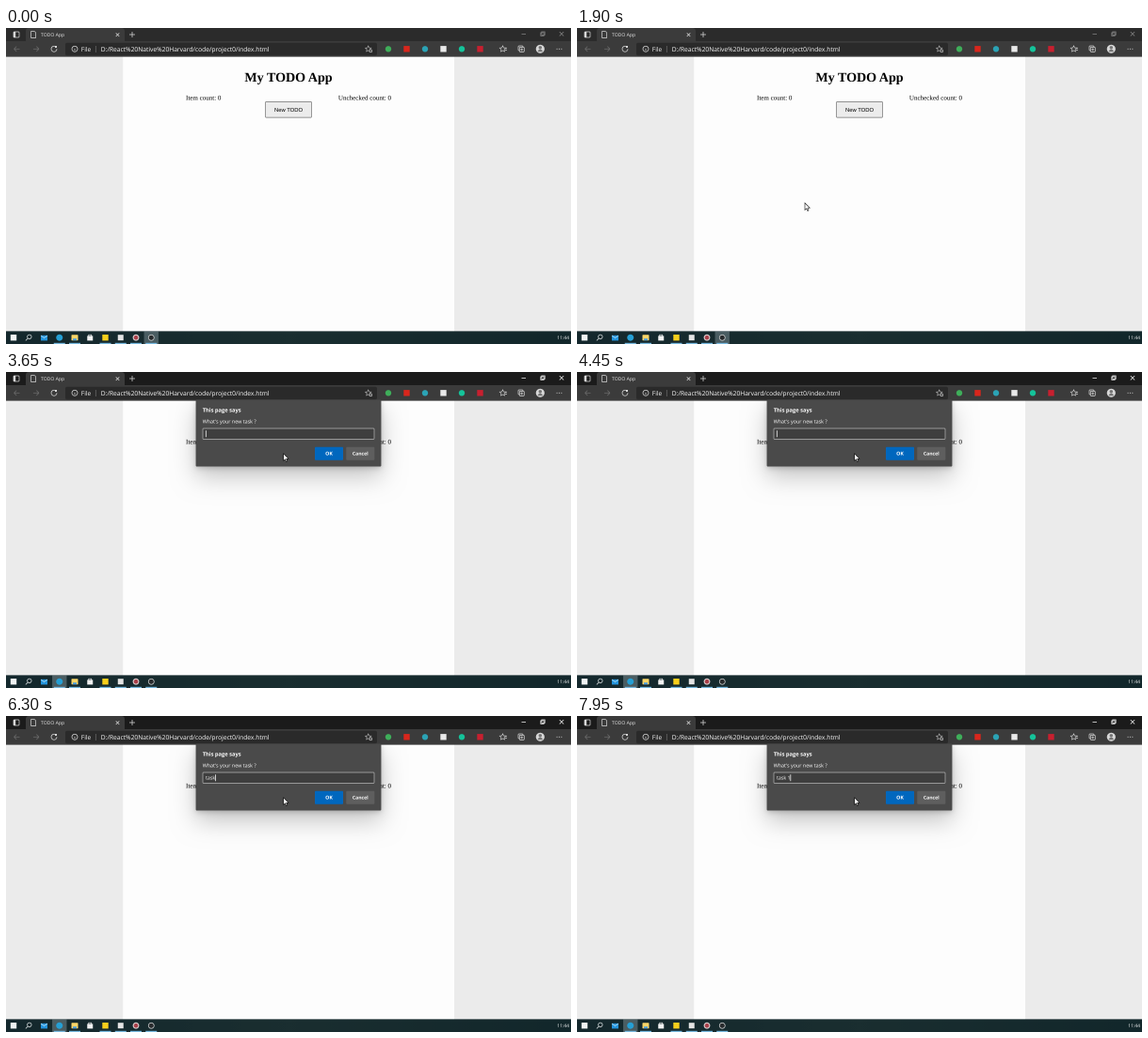
Animation of 600 by 336 pixels, one loop 8 s. Source, as an HTML page with a canvas:

```html
<!DOCTYPE html>
<html lang="en">
<head>
<meta charset="utf-8">
<title>TODO App</title>
<style>
html, body { margin: 0; width: 100%; height: 100%; overflow: hidden; background: #ebebeb; }
canvas { display: block; width: 600px; height: 336px; }
</style>
</head>
<body>
<canvas id="stage"></canvas>
<script>
const W = 600, H = 336, LOOP = 8000, TAU = 2 * Math.PI;
const UI = '"Open Sans", "Noto Sans", sans-serif';
const SANS = '"Liberation Sans", Arial, sans-serif';
const SERIF = '"Liberation Serif", "Times New Roman", serif';

const PRESS = 3050, RELEASE = 3350, DIALOG = 3450;
const BURSTS = [
  { word: 'task', start: 5650, gap: 150 },
  { word: ' 1', start: 6600, gap: 250 },
];

const canvas = document.getElementById('stage');
const ctx = canvas.getContext('2d');
// Drawn at double size so that small text scales down softly.
const scale = 2 * (window.devicePixelRatio || 1);
canvas.width = W * scale;
canvas.height = H * scale;
ctx.textRendering = 'geometricPrecision';

function ease(t, from, to) {
  const u = Math.min(1, Math.max(0, (t - from) / (to - from)));
  return u * u * (3 - 2 * u);
}

function rect(x, y, w, h, fill, r = 0) {
  ctx.fillStyle = fill;
  ctx.beginPath();
  ctx.roundRect(x, y, w, h, r);
  ctx.fill();
}

function frame(x, y, w, h, color, r = 0) {
  ctx.strokeStyle = color;
  ctx.lineWidth = 0.7;
  ctx.beginPath();
  ctx.roundRect(x, y, w, h, r);
  ctx.stroke();
}

function square(x, y, r, fill) {
  rect(x - r, y - r, 2 * r, 2 * r, fill);
}

function disc(x, y, r, fill, end = TAU) {
  ctx.fillStyle = fill;
  ctx.beginPath();
  ctx.arc(x, y, r, end === TAU ? 0 : Math.PI, end === TAU ? TAU : end + Math.PI);
  ctx.fill();
}

function ring(x, y, r, color, end = TAU) {
  ctx.strokeStyle = color;
  ctx.lineWidth = 0.75;
  ctx.beginPath();
  ctx.arc(x, y, r, 0, end);
  ctx.stroke();
}

function line(x, y, dx, dy, color) {
  ctx.strokeStyle = color;
  ctx.lineWidth = 0.75;
  ctx.beginPath();
  ctx.moveTo(x, y);
  ctx.lineTo(x + dx, y + dy);
  ctx.stroke();
}

function cross(x, y, r, color) {
  for (const s of [-1, 1]) line(x - r, y - s * r, 2 * r, 2 * s * r, color);
}

function plus(x, y, r, color) {
  line(x - r, y, 2 * r, 0, color);
  line(x, y - r, 0, 2 * r, color);
}

function arrow(x, y, dir, color) {
  line(x - 3, y, 6, 0, color);
  for (const s of [-1, 1]) line(x + 3 * dir, y, -2.7 * dir, 2.7 * s, color);
}

function star(x, y, r, color) {
  ctx.strokeStyle = color;
  ctx.lineWidth = 0.6;
  ctx.beginPath();
  for (let i = 0; i < 10; i++) {
    const a = (i / 10) * TAU - TAU / 4, d = i % 2 ? r * 0.48 : r;
    ctx.lineTo(x + d * Math.cos(a), y + d * Math.sin(a));
  }
  ctx.closePath();
  ctx.stroke();
}

function text(str, x, y, size, color, { family = UI, weight = 400, align = 'left' } = {}) {
  ctx.font = `${weight} ${size}px ${family}`;
  ctx.textAlign = align;
  ctx.fillStyle = color;
  ctx.fillText(str, x, y);
}

function drawPage(pressed) {
  rect(0, 30, W, 293, '#ebebeb');
  rect(124.2, 30, 351.8, 293, '#fdfdfd');
  text('My TODO App', 300, 57.2, 14.05, '#000', { family: SERIF, weight: 700, align: 'center' });
  text('Item count: 0', 191, 76.6, 7.03, '#000', { family: SERIF });
  text('Unchecked count: 0', 409, 76.6, 7.03, '#000', { family: SERIF, align: 'right' });
  rect(275.5, 78.5, 49, 16.6, pressed ? '#f5f5f5' : '#ececec', 0.8);
  frame(275.5, 78.5, 49, 16.6, pressed ? '#8d8d8d' : '#707070', 0.8);
  text('New TODO', 300, 89, 5.86, '#000', { family: SANS, align: 'center' });
}

function drawTabs(focused) {
  const pale = '#d8d8d8', tone = focused ? '#f2f2f2' : '#858585';
  rect(0, 0, W, 15, focused ? '#1b1b1b' : '#2b2b2b');
  rect(21, 0, 105, 16, '#3b3b3b', [3, 3, 0, 0]);
  frame(8, 4, 6, 6, pale, 1);
  rect(8, 4, 2.2, 6, pale);
  frame(26.6, 3.6, 5, 6.8, pale, [0, 2, 0, 0]);
  text('TODO App', 37, 9, 5.08, '#e8e8e8');
  cross(118.5, 7.2, 1.8, pale);
  plus(134, 7, 3, pale);
  line(547.5, 6.4, 4.5, 0, tone);
  frame(567.8, 5, 3.4, 3.4, tone);
  frame(568.8, 4, 3.4, 3.4, tone);
  cross(590, 6.3, 2.2, tone);
}

function drawToolbar() {
  const pale = '#d8d8d8', y = 22.3;
  rect(0, 14, W, 16.6, '#3b3b3b');
  arrow(11.5, y, -1, '#6c6c6c');
  arrow(32, y, 1, '#6c6c6c');
  ring(51, y, 3, pale, 5.4);
  rect(52, 19, 2, 2, pale);

  rect(63, 15.8, 331, 13.4, '#2a2a2a', 2);
  ring(73, y, 3, pale);
  line(73, 21.8, 0, 2.4, pale);
  text('File', 79.8, 24.9, 6.6, '#f0f0f0');
  line(95.3, 19, 0, 7, '#6a6a6a');
  text('D:/React%20Native%20Harvard/code/project0/index.html', 100.8, 24.9, 6.7, '#fafafa');
  star(384.7, y, 3.3, '#bdbdbd');
  disc(387.3, 24.4, 1.8, '#2a2a2a');
  ring(387.3, 24.4, 1.4, '#bdbdbd');

  const extensions = ['#3fae5a', '#d9261c', '#2ba3b5', '#e9e9e9', '#15c39a', '#c8202f'];
  extensions.forEach((color, i) => (i % 2 ? square : disc)(406 + 19.5 * i, y, 3.2, color));

  star(527.5, y, 3.4, pale);
  for (const dy of [-1, 1]) line(530, y + dy, 2, 0, pale);
  frame(544, 19, 5, 5, pale, 1);
  rect(545.3, 20.4, 5, 5, '#3b3b3b', 1);
  frame(545.3, 20.4, 5, 5, pale, 1);
  plus(547.8, 22.9, 1.5, pale);
  disc(567.3, y, 4.6, pale);
  disc(567.3, y - 1.5, 1.7, '#747474');
  disc(567.3, y + 3, 2.6, '#747474', Math.PI);
  for (const i of [-1, 0, 1]) disc(587.5 + 2.4 * i, y, 0.55, pale);
}

const taskIcons = [
  (x, y) => square(x, y, 3.2, '#f0f4f5'),
  (x, y) => {
    ring(x + 0.6, y - 0.9, 2.2, '#e6eaeb');
    line(x - 1, y + 0.8, -2.4, 2.4, '#e6eaeb');
  },
  (x, y) => {
    rect(x - 3.5, y - 2.4, 7, 5.6, '#2494dc');
    for (const s of [-1, 1]) line(x, y + 0.4, 3.5 * s, -2.6, '#b9e2fa');
  },
  (x, y) => disc(x, y, 3.5, '#259fd4'),
  (x, y) => {
    rect(x - 3.5, y - 3, 7, 6, '#f8d568', 0.6);
    rect(x - 2, y + 1, 4, 2, '#4a9ddc');
  },
  (x, y) => {
    frame(x - 1.5, y - 3, 3, 2, '#f2f2f2');
    rect(x - 3, y - 1.8, 6, 5, '#f2f2f2');
  },
  (x, y) => square(x, y, 3.2, '#f7cf1c'),
  (x, y) => square(x, y, 3, '#e4e4e4'),
  (x, y) => {
    disc(x, y, 3.4, '#dccfcf');
    disc(x, y, 2.3, '#a8404a');
  },
  (x, y) => {
    disc(x, y, 3.2, '#292c2e');
    ring(x, y, 3, '#d0d3d4');
  },
];

function drawTaskbar(focused) {
  const top = 322.4, active = focused ? 3 : 9;
  const bar = ctx.createLinearGradient(0, 0, W, 0);
  bar.addColorStop(0, '#14282d');
  bar.addColorStop(0.5, '#1a2e30');
  bar.addColorStop(1, '#12272b');
  rect(0, top, W, H - top, bar);
  taskIcons.forEach((icon, i) => {
    const x = 8 + 16.25 * i;
    if (i === active) rect(x - 7.7, top, 15.4, H - top, '#4a5d62');
    if (i > 2 && i !== 5) rect(x - 6, 334.8, 12, 1.2, '#76b9e0');
    icon(x, 329.2);
  });
  text('11:44', 598, 331, 5, '#fff', { align: 'right' });
}

function typing(t) {
  let value = '', last = DIALOG;
  for (const { word, start, gap } of BURSTS) {
    const n = Math.min(word.length, Math.floor((t - start) / gap) + 1);
    if (n < 1) break;
    value += word.slice(0, n);
    last = start + (n - 1) * gap;
  }
  return { value, caret: (t - last) % 1000 < 500 };
}

function panel(blur, dy, alpha) {
  ctx.shadowColor = `rgba(0,0,0,${alpha})`;
  ctx.shadowBlur = blur * scale;
  ctx.shadowOffsetY = dy * scale;
  rect(201.7, 29.5, 196.6, 71, '#4a4a4a', 1);
}

function button(label, x, size, fill) {
  rect(x, 79.8, 30, 13.9, fill, 0.8);
  text(label, x + 15, 88.6, size, '#fff', { weight: 700, align: 'center' });
}

function drawDialog(t) {
  ctx.save();
  ctx.beginPath();
  ctx.rect(0, 29.5, W, H);
  ctx.clip();
  panel(25, 11, 0.22);
  panel(6, 2, 0.18);
  ctx.restore();

  text('This page says', 208.7, 42.5, 5.75, '#fff', { weight: 700 });
  text("What's your new task ?", 208.7, 54.7, 5.4, '#fff');
  rect(209, 60, 182, 11.4, '#3e3e3e', 0.8);
  frame(209, 60, 182, 11.4, '#b4b4b4', 0.8);
  const { value, caret } = typing(t);
  text(value, 212, 67.5, 5.3, '#fff');
  if (caret) line(212.3 + ctx.measureText(value).width, 62.2, 0, 7, '#fff');
  button('OK', 328, 5.3, '#0067be');
  button('Cancel', 361.3, 5.1, '#5e5e5e');
}

const arrowhead = new Path2D('M0 0V7.5L1.7 6 2.9 8.5 4 8 2.9 5.5 5.2 5.4Z');

function drawPointer(t) {
  const enter = ease(t, 1050, 1700), aim = ease(t, 2250, 2900);
  ctx.save();
  ctx.translate(206 + 36 * enter + 52.7 * aim, 340 - 154 * enter - 99.2 * aim);
  ctx.fillStyle = '#fff';
  ctx.fill(arrowhead);
  ctx.strokeStyle = '#111';
  ctx.lineWidth = 0.6;
  ctx.stroke(arrowhead);
  ctx.restore();
}

function draw(t) {
  const focused = t >= PRESS;
  ctx.setTransform(scale, 0, 0, scale, 0, 0);
  drawPage(focused && t < RELEASE);
  drawTabs(focused);
  drawToolbar();
  if (t >= DIALOG) drawDialog(t);
  drawTaskbar(focused);
  drawPointer(t);
}

const start = performance.now();
function tick() {
  draw((performance.now() - start) % LOOP);
  requestAnimationFrame(tick);
}
tick();
</script>
</body>
</html>
```
